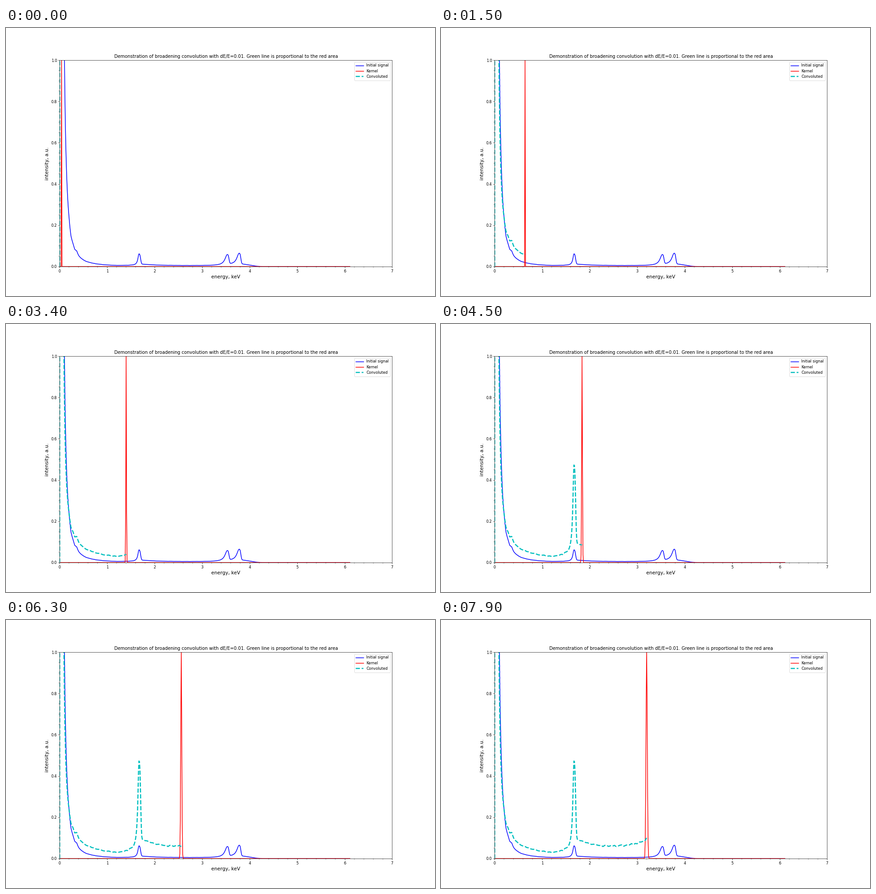
Write a matplotlib script that moves like this. It is 947 by 592 pixels and loops after 8 s.

```python
import numpy as np
import matplotlib.pyplot as plt
from matplotlib.animation import FuncAnimation

FRAMES, INTERVAL = 80, 100
STEP = 0.01        # energy grid, keV
RESOLUTION = 0.01  # dE/E as full width at half maximum
SIGMA = RESOLUTION / 2.355


def sigmoid(x):
    return 1 / (1 + np.exp(-x))


def peak(x, x0, height, rise, fall=0.04):
    """Line with a Lorentzian rise, a sharp drop and a slowly fading shoulder."""
    d = np.maximum(x - x0, 0)
    drop = np.exp(-(d / fall) ** 3)
    shoulder = 0.13 * np.exp(-d / 0.3) * (1 - drop)
    left = 1 / (1 + ((x - x0) / rise) ** 2)
    return height * np.where(x < x0, left, drop + shoulder)


def ripple(x, amount=0.04, spacing=0.04):
    """Slow random wobble around one."""
    rng = np.random.default_rng(3)
    nodes = np.arange(0, x[-1] + spacing, spacing)
    return 1 + amount * np.interp(x, nodes, rng.standard_normal(len(nodes)))


def signal(x):
    slope = 0.0074 * np.maximum(x, STEP) ** -2.15
    continuum = 0.0036 * sigmoid((x - 1.4) / 0.08)
    lines = (peak(x, 1.67, 0.0555, 0.027)
             + peak(x, 3.53, 0.051, 0.06)
             + peak(x, 3.78, 0.0585, 0.06))
    cutoff = sigmoid((4.08 - x) / 0.06)
    return ((slope + continuum) * ripple(x) + lines) * cutoff


def kernel(x, e):
    return np.exp(-0.5 * ((x - e) / (SIGMA * e)) ** 2)


energy = np.arange(612) * STEP
initial = signal(energy)
# The kernel area grows with energy, with a floor at the low end
gain = ((4.6 * energy) ** 4 + 0.75 ** 4) ** 0.25
convoluted = gain * initial
convoluted[0] = 0

fig, ax = plt.subplots(figsize=(16, 10), dpi=59.2)
ax.plot(energy, initial, "b", lw=1.8, label="Initial signal")
kernel_line, = ax.plot([], [], "r", lw=1.8, label="Kernel")
conv_line, = ax.plot([], [], "c--", lw=3, label="Convoluted")
ax.set_xlim(0, 7)
ax.set_ylim(0, 1)
ax.minorticks_on()
ax.set_xlabel("energy, keV", fontsize=13)
ax.set_ylabel("intensity, a.u.", fontsize=13)
ax.set_title("Demonstration of broadening convolution with dE/E=0.01. "
             "Green line is proportional to the red area")
ax.legend(loc="upper right", labelspacing=0.42)


def update(i):
    k = 4 * (i + 1)
    kernel_line.set_data(energy, kernel(energy, energy[k]))
    conv_line.set_data(energy[:k + 1], convoluted[:k + 1])
    return kernel_line, conv_line


anim = FuncAnimation(fig, update, frames=FRAMES, interval=INTERVAL,
                     repeat=True, repeat_delay=0)
plt.show()
```
